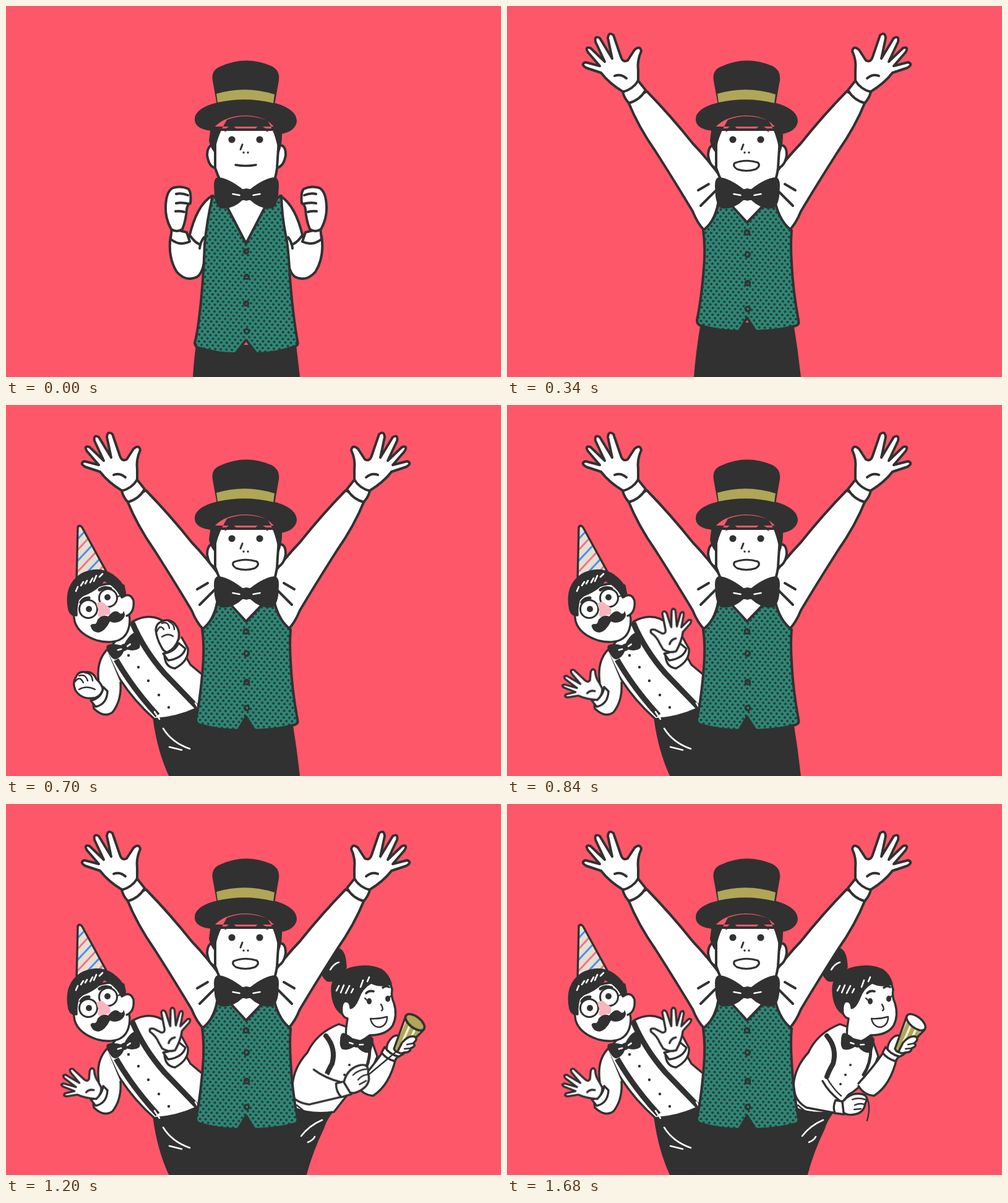
Animation, 800 px wide and 600 px high, one loop 2.48 s. Source, as an HTML page without scripts:

```html
<!DOCTYPE html>
<html lang="en">
<head>
<meta charset="utf-8">
<title>Party trio</title>
<style>
html, body { margin: 0; width: 100%; height: 100%; overflow: hidden; background: #ff576a; }
svg { display: block; width: 100%; height: 100%; fill: #fff; stroke: #313131; stroke-width: 4; stroke-linejoin: round; stroke-linecap: round; }
path, ellipse, circle { vector-effect: non-scaling-stroke; }
.side { stroke-width: 3.4; }
.ink { fill: #313131; }
.dot { fill: #313131; stroke: none; }
.line { fill: none; }
.shine { fill: none; stroke: #fff; stroke-width: 2.6; }
.gold { fill: #b0a657; }
.thin { stroke-width: 2.4; }
.bare { stroke: none; }

/* every pose is held, then cut */
[class*="t-"] { animation: 2480ms step-end infinite; }
.t-ready { animation-name: ready; }
.t-cheer { animation-name: cheer; }
.t-raise { animation-name: raise; transform-origin: 388px 320px; }
.t-stretch { animation-name: stretch; transform-origin: 388px 300px; }
.t-guest { animation-name: guest; transform-origin: 381px 597px; }
.t-fists { animation-name: fists; }
.t-palms { animation-name: palms; }
.t-palm-l { animation-name: unfold; transform-origin: 150px 468px; }
.t-palm-r { animation-name: unfold; transform-origin: 263px 398px; }
.t-popper { animation-name: popper; transform-origin: 403px 616px; }
.t-pull { animation-name: pull; transform-origin: 472px 478px; }
.t-armed { animation-name: armed; }
.t-fired { animation-name: fired; }
.t-burst { animation-name: burst; }
.t-early { animation-name: early; }

@keyframes ready { 0% { visibility: visible } 8.06%, to { visibility: hidden } }
@keyframes cheer { 0% { visibility: hidden } 8.06%, to { visibility: visible } }
@keyframes raise { 0%, 8.06% { transform: scale(.74) } 10.89% { transform: scale(.95) } 13.71%, to { transform: none } }
@keyframes stretch { 0%, 8.06% { transform: scaleY(1.1) } 10.89% { transform: scaleY(1.03) } 13.71%, to { transform: none } }
@keyframes guest {
  0% { visibility: hidden; transform: rotate(33deg) }
  19.76% { visibility: visible; transform: rotate(33deg) }
  22.58% { visibility: visible; transform: rotate(25deg) }
  25.4% { visibility: visible; transform: rotate(9deg) }
  28.23%, to { visibility: visible; transform: none }
}
@keyframes fists { 0% { opacity: 1 } 31.05%, to { opacity: 0 } }
@keyframes palms { 0% { opacity: 0 } 31.05%, to { opacity: 1 } }
@keyframes unfold { 0%, 31.05% { transform: scale(.84) } 33.87%, to { transform: none } }
@keyframes popper {
  0% { visibility: hidden; transform: rotate(-33deg) }
  39.92% { visibility: visible; transform: rotate(-33deg) }
  42.74% { visibility: visible; transform: rotate(-25deg) }
  45.56% { visibility: visible; transform: rotate(-9deg) }
  48.39%, to { visibility: visible; transform: none }
}
@keyframes pull { 0% { transform: rotate(-24deg) scale(1.13) } 56.45%, to { transform: none } }
@keyframes armed { 0% { opacity: 1 } 56.45%, to { opacity: 0 } }
@keyframes fired { 0% { opacity: 0 } 59.27%, to { opacity: 1 } }
@keyframes burst {
  0% { opacity: 0; transform: none }
  56.45% { opacity: 1; transform: none }
  59.27% { opacity: 1; transform: translate(28px, -30px) }
  62.1% { opacity: 1; transform: translate(48px, -52px) }
  64.92% { opacity: 1; transform: translate(62px, -66px) }
  67.74%, to { opacity: 0; transform: none }
}
@keyframes early { 0% { opacity: 1 } 62.1%, to { opacity: 0 } }
</style>
</head>
<body>
<svg viewBox="0 0 800 600">
<defs>
  <pattern id="dots" width="9" height="11" patternUnits="userSpaceOnUse" patternTransform="rotate(3)">
    <path class="bare" fill="#2a8a78" d="M0 0H9V11H0Z"/>
    <circle class="dot" cx="2.3" cy="2.8" r="2.05"/>
    <circle class="dot" cx="6.8" cy="8.3" r="2.05"/>
  </pattern>
  <pattern id="stripes" width="24" height="24" patternUnits="userSpaceOnUse" patternTransform="rotate(-47)">
    <path class="bare" fill="#e6e0d0" d="M0 0H24V24H0Z"/>
    <path class="bare" fill="#f0738c" d="M0 3H24V6H0Z"/>
    <path class="bare" fill="#4f8cf0" d="M0 15H24V18H0Z"/>
  </pattern>
  <pattern id="foil" width="10" height="10" patternUnits="userSpaceOnUse" patternTransform="rotate(24)">
    <path class="bare" fill="#b0a657" d="M0 0H10V10H0Z"/>
    <path class="bare" fill="#f3efd9" d="M0 0H3.6V10H0Z"/>
  </pattern>

  <g id="hand">
    <path d="M188 139Q165 125 152 108L128 100Q118 94 127 91L150 97L131 75Q125 65 135 68L158 90L143 58Q141 47 150 52L170 85L163 52Q164 41 172 47L184 82Q187 92 195 88L206 71Q215 63 217 73Q210 88 212 104V120Q206 135 188 139Z"/>
    <path class="line" d="M174 113Q184 109 193 117"/>
  </g>
  <g id="bow">
    <path class="ink" d="M-7-7Q-30-25-46-26Q-52-24-50-7Q-50 13-42 20Q-24 23-7 7H7Q24 23 42 20Q50 13 50-7Q52-24 46-26Q30-25 7-7Z"/>
    <circle class="ink" r="8"/>
    <path class="shine" d="M-22-1L-11 1M11 1L22-1"/>
  </g>
  <g id="raised">
    <path d="M196 155Q212 195 240 235Q275 290 300 332Q308 352 319 363Q338 345 343 310L348 280Q325 248 300 222Q265 178 226 138Z"/>
    <path class="line" d="M309 298L326 288M313 323L337 299"/>
    <use href="#hand"/>
    <path d="M187 139Q203 135 212 121L224 136Q215 152 197 157Q190 150 187 139Z"/>
  </g>
  <g id="bent">
    <path d="M333 307Q308 322 296 374L266 372Q261 406 276 430Q291 447 309 438Q316 433 319 420L330 360Z"/>
    <path class="line" d="M298 372Q305 382 312 385M320 374Q314 382 313 392"/>
    <path d="M268 360L266 377Q281 389 297 381L292 366Z"/>
    <path d="M267 361Q257 343 258 324Q259 299 270 294Q283 290 295 296Q300 302 298 319Q293 321 292 329Q291 346 285 361Q276 367 267 361Z"/>
    <path class="line" d="M275 304Q284 302 294 306M275 319Q284 317 296 320M274 332Q281 331 288 333"/>
  </g>
  <path id="chip" class="thin" d="M-4-3L2-5L5 2L-1 5Z"/>
</defs>

<!-- guest with the paper hat -->
<g class="side t-guest">
  <path class="ink" d="M239 506Q246 560 266 602L310 690H430V490H310Z"/>
  <path class="shine" d="M254 523Q268 546 297 556M264 553L284 558"/>
  <path d="M163 400Q180 376 205 350Q236 333 262 355L298 420L340 455V490L310 490Q275 506 240 508Q206 478 182 440Z"/>
  <path class="line" style="stroke-width:9;stroke-linecap:butt" d="M204 352Q222 395 256 434L310 490M178 412Q206 460 245 502"/>
  <path d="M240 496L248 508M306 482L312 492" style="stroke:#fff;stroke-width:2.5"/>
  <g class="dot"><circle cx="198" cy="405" r="2.2"/><circle cx="214" cy="424" r="2.2"/><circle cx="230" cy="446" r="2.2"/><circle cx="247" cy="469" r="2.2"/><circle cx="263" cy="489" r="2.2"/></g>
  <path d="M163 396Q145 415 150 449Q138 474 142 491Q159 507 172 497Q187 478 185 449"/>
  <path d="M256 402Q256 424 273 426Q296 414 294 394L284 376"/>

  <path d="M115 316Q107 334 111 350Q117 371 148 381Q168 386 183 380Q200 372 200 346L190 292Q150 280 115 316Z"/>
  <path d="M188 311Q200 302 206 316Q208 336 195 341"/>
  <path d="M116 197Q119 193 123 198L162 269Q138 272 114 285Z" fill="url(#stripes)"/>
  <path class="ink" d="M102 331Q94 292 122 274Q150 260 173 276Q192 290 192 306L187 311Q179 293 158 283Q148 300 118 310Q113 324 114 340Q105 341 102 331Z"/>
  <path class="shine" d="M113 301L116 294M121 292L125 286M128 289L131 284M142 285L146 276M151 278L156 273M136 287L140 280"/>
  <path class="line" style="stroke-width:5" d="M121 319Q125 312 134 312M151 299Q159 293 169 297"/>
  <path class="line thin" d="M178 311L190 306M146 325L152 320"/>
  <circle cx="133" cy="330" r="14.5" style="stroke-width:3"/>
  <circle cx="165" cy="312" r="14.5" style="stroke-width:3"/>
  <circle class="dot" cx="134" cy="330" r="5"/><circle class="dot" cx="164" cy="311" r="5"/>
  <path class="bare" fill="#f8b5c0" d="M146 322Q154 314 161 323Q172 329 167 339Q160 339 155 343Q145 343 150 334Z"/>
  <path class="dot" d="M138 361Q134 355 141 354Q146 356 148 347Q156 338 165 342Q176 328 184 337Q189 339 190 333Q196 343 184 350Q175 354 168 350Q160 366 150 368Q141 368 138 361Z"/>
  <use href="#bow" transform="translate(191 392) rotate(-25) scale(.5)"/>

  <path d="M137 478Q155 474 157 456L164 463Q163 484 145 488Z"/>
  <path d="M254 402Q272 400 279 385L290 394Q285 410 262 413Z"/>
  <g class="t-fists">
    <path d="M140 474Q121 476 112 461Q107 449 113 440Q117 430 128 432Q140 430 146 443Q158 455 156 462Q151 474 140 474Z"/>
    <path class="line thin" d="M112 447Q119 437 125 449M118 438Q128 434 132 446M128 433Q139 434 140 446M118 460Q130 453 144 460"/>
    <path d="M251 391Q243 377 242 363Q243 353 252 350Q262 345 272 353Q282 364 279 378Q273 395 260 400Q254 398 251 391Z"/>
    <path class="line thin" d="M244 366Q249 354 255 363M252 353Q262 349 264 361M263 350Q272 354 272 363M252 375Q262 368 270 374"/>
  </g>
  <g class="t-palms">
    <g class="t-palm-l"><use href="#hand" transform="translate(150 468) rotate(-28) scale(.66) translate(-200 -130)"/></g>
    <g class="t-palm-r"><use href="#hand" transform="translate(263 397) rotate(-30) scale(-.7 .7) translate(-200 -130)"/></g>
  </g>
</g>

<!-- guest with the party popper -->
<g class="side t-popper">
  <path class="ink" d="M440 480L470 494Q500 503 525 500Q516 512 512 525Q494 562 484 600L460 690H400Z"/>
  <path class="shine" d="M477 537Q490 520 511 511M488 547Q496 544 499 538"/>
  <path d="M538 356Q502 370 487 402Q465 426 463 455L461 490Q494 504 530 498L552 470Q584 452 600 408L588 374Z"/>
  <path class="line" style="stroke-width:8" d="M517 375Q534 395 527 420Q520 432 517 441"/>
  <path class="line" style="stroke-width:5" d="M588 396Q588 420 576 438"/>
  <path class="line thin" d="M515 440Q528 462 540 472M470 487L482 497M474 455Q484 462 496 460"/>
  <g class="dot"><circle cx="555" cy="422" r="2"/><circle cx="547" cy="438" r="2"/><circle cx="539" cy="453" r="2"/></g>
  <path d="M568 452Q590 428 609 401L630 411Q620 455 593 472Q576 470 568 456"/>

  <path class="ink" d="M538 235Q548 238 549 264Q536 290 519 285Q506 275 513 255Q522 240 538 235Z"/>
  <path class="shine" d="M516 262Q519 250 528 246M524 268Q530 258 538 256"/>
  <path d="M550 316Q539 318 541 334Q545 346 552 347Q549 362 549 378L574 384L588 374Q615 374 625 358Q633 342 627 322Q622 312 624 300L620 286L560 292Z"/>
  <path class="ink" d="M528 312Q522 280 548 269Q580 257 606 268Q618 276 622 291Q605 296 590 289Q575 297 569 315Q563 329 557 330Q556 318 548 319Q541 322 543 339Q531 331 528 312Z"/>
  <path class="shine" d="M534 302L538 294M541 305L546 293M549 306L555 294M558 305L561 299M573 296L577 285M584 287L587 280"/>
  <path class="line" style="stroke-width:3.6" d="M582 306Q587 301 594 303M609 297Q614 293 619 296"/>
  <ellipse class="dot" cx="587" cy="319" rx="4" ry="5"/><ellipse class="dot" cx="617" cy="315" rx="4" ry="5"/>
  <path class="line thin" d="M583 317L580 314M620 312L623 310M606 324Q611 332 607 334"/>
  <path class="thin" d="M589 347Q603 348 616 344Q616 358 604 361Q592 361 589 347Z"/>
  <use href="#bow" transform="translate(566 388) rotate(8) scale(.5)"/>

  <path d="M616 405Q612 387 626 376Q637 370 637 384L650 396Q642 407 630 410Z"/>
  <path d="M646 343L627 396Q631 404 640 401L675 365Z" fill="url(#foil)"/>
  <ellipse cx="661" cy="353" rx="18" ry="9" transform="rotate(38 661 353)"/>
  <ellipse class="gold t-armed" cx="661" cy="353" rx="18" ry="9" transform="rotate(38 661 353)"/>
  <path d="M640 386Q650 374 660 376Q667 380 658 387Q664 391 654 395Q654 402 643 402Q636 405 633 400Z"/>
  <path class="line thin" d="M658 387L648 389M654 395L644 396"/>
  <path d="M612 393Q620 405 633 408L628 416Q614 412 607 402Z"/>

  <path class="line thin t-armed" d="M582 441L629 402"/>
  <path class="line thin t-fired" d="M580 473Q589 486 582 512"/>
  <g class="t-pull">
    <path class="bare" d="M468 455L515 448L537 480L533 500L485 492Z"/>
    <path class="line" d="M510 448Q520 466 538 480M464 460Q465 480 484 491L532 500"/>
    <path d="M531 479L542 481L545 502L530 500Q526 490 531 479Z"/>
    <path d="M542 482Q554 466 573 469Q586 472 579 484Q577 500 561 502Q549 504 544 499Z"/>
    <path class="line thin" d="M558 478Q568 474 579 478M562 487Q570 483 578 486M561 494L572 493"/>
  </g>
</g>

<!-- host -->
<g class="t-ready">
  <path class="ink bare" d="M307 548Q303 580 302 600H475L469 548Z"/>
  <use href="#bent"/><use href="#bent" transform="translate(776) scale(-1 1)"/>
  <path fill="url(#dots)" d="M334 307Q325 345 321 385Q319 450 312 505Q309 530 305 545Q306 552 312 553Q345 563 371 562L388 540L405 562Q440 561 468 550Q473 548 471 542Q463 495 459 440Q456 385 452 370Q446 340 445 307L418 322L388 384L357 322Z"/>
  <path d="M346 303L388 384L430 303Z"/>
  <g class="line" style="stroke-width:3"><circle cx="388" cy="397" r="3.6"/><circle cx="389" cy="438" r="3.6"/><circle cx="388" cy="481" r="3.6"/><circle cx="389" cy="526" r="3.6"/></g>
</g>
<g class="t-cheer">
  <path class="ink bare" d="M313 512Q305 560 302 600H475Q470 555 463 512Z"/>
  <g class="t-raise"><use href="#raised"/><use href="#raised" transform="translate(775) scale(-1 1)"/></g>
  <g class="t-stretch">
    <path fill="url(#dots)" d="M341 320Q338 346 317 363Q321 390 318 425Q314 475 307 508Q307 515 313 517Q345 526 375 526L388 504L402 526Q440 525 467 517Q473 515 471 508Q462 460 460 415Q458 385 460 363Q442 350 434 320L412 324L388 350L365 324Z"/>
    <path d="M352 306L366 326L388 350L411 326L424 306Z"/>
    <g class="line" style="stroke-width:3"><circle cx="388" cy="366" r="3.8"/><circle cx="389" cy="402" r="3.8"/><circle cx="389" cy="448" r="3.8"/><circle cx="389" cy="490" r="3.8"/></g>
  </g>
</g>
<path d="M338 226Q326 222 325 241Q328 261 339 262M439 226Q452 222 452 241Q449 260 437 262"/>
<path d="M338 200V262Q342 274 347 284V304H430L433 284Q437 272 438 262L442 200Z"/>
<path class="dot" d="M331 195L328 218Q331 232 338 238Q339 214 357 184Q388 172 422 185Q434 200 441 238Q447 226 446 195Z"/>
<path class="dot" d="M341 160L334 121Q331 104 346 98Q387 79 429 97Q443 104 441 120L434 160Z"/>
<path class="dot" d="M305 183C305 161 350 151 387 151C426 151 470 162 470 186C469 199 455 207 440 207Q428 178 387 177Q348 178 332 202C316 200 305 195 305 183Z"/>
<path class="gold bare" d="M340 142Q387 128 434 143L432 157Q387 146 342 156Z"/>
<circle class="dot" cx="365" cy="216" r="5.6"/><circle class="dot" cx="410" cy="216" r="5.6"/>
<path class="dot" d="M353 204Q357 193 366 194Q372 196 373 202Q362 198 353 204ZM402 201Q404 194 412 194Q420 196 424 204Q412 198 402 201Z"/>
<path class="line" style="stroke-width:3" d="M382 224L379 232"/>
<circle class="dot" cx="384" cy="237" r="1.7"/><circle class="dot" cx="391" cy="237" r="1.7"/>
<path class="line t-ready" style="stroke-width:3.4" d="M371 257Q387 260 404 257"/>
<path class="t-cheer" style="stroke-width:3.2" d="M368 254Q386 247 405 253Q411 258 402 264Q387 269 372 264Q364 259 368 254Z"/>
<use href="#bow" transform="translate(388.5 305)"/>

<!-- popper burst -->
<g class="t-burst thin">
  <g class="t-early">
    <path class="line" style="stroke-width:6" d="M675 345Q690 326 706 313L721 288"/>
    <path class="line" style="stroke:#b0a657;stroke-width:2" d="M700 317L706 313L721 288"/>
    <path class="gold" d="M673 315Q672 296 688 283L692 287Q681 298 678 315Z"/>
    <use href="#chip" x="663" y="308" fill="#8c5f9c"/><use href="#chip" x="684" y="323" fill="#8c5f9c"/><use href="#chip" x="692" y="344" fill="#4379d6"/><use href="#chip" x="661" y="346" fill="#4379d6"/><use href="#chip" x="719" y="344" fill="#4379d6"/><use href="#chip" x="701" y="309" fill="#8c5f9c"/>
  </g>
  <path class="gold" d="M694 303Q692 285 703 268Q713 250 712 234L718 236Q720 252 709 270Q698 286 698 302ZM705 290Q706 272 722 257Q731 247 736 231L741 235Q738 250 727 260Q714 274 709 288ZM731 319Q736 294 755 283Q768 276 773 261L779 259Q776 277 759 288Q744 296 736 316Z"/>
  <ellipse class="gold" cx="771" cy="214" rx="9" ry="17" transform="rotate(-16 771 214)"/>
  <use href="#chip" x="663" y="272" fill="#8c5f9c"/><use href="#chip" x="691" y="246" fill="#8c5f9c"/><use href="#chip" x="687" y="279" fill="#4379d6"/><use href="#chip" x="721" y="231" fill="#4379d6"/><use href="#chip" x="752" y="241" fill="#8c5f9c"/><use href="#chip" x="741" y="270" fill="#8c5f9c"/><use href="#chip" x="749" y="316" fill="#4379d6"/>
</g>
</svg>
</body>
</html>
```
